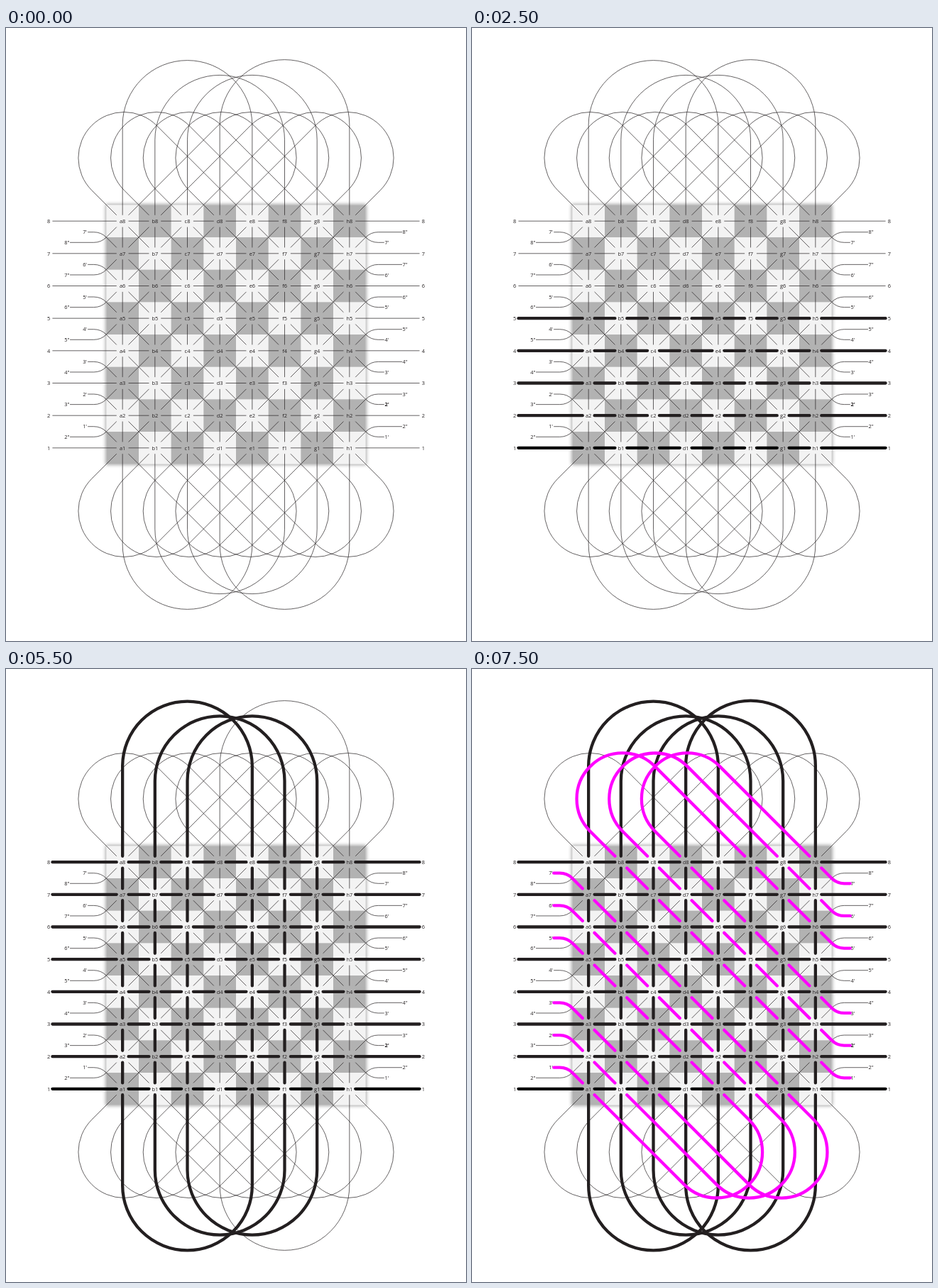
Animation, 648 px wide and 864 px high, one loop 8000 ms. Source, as an HTML page:

```html
<!DOCTYPE html>
<html lang="en">
<head>
<meta charset="utf-8">
<title>Chessboard loops</title>
<style>
  html, body { margin: 0; width: 100%; height: 100%; overflow: hidden; background: #fff; }
  svg { display: block; width: 100vw; height: 100vh; }
  path { fill: none; }
  text { font: 7.4px "Open Sans", "Noto Sans", sans-serif; fill: #231f20; }
  .thin { stroke: #231f20; stroke-width: .7; }
  .thick { stroke: #231f20; stroke-width: 4.3; stroke-linecap: round; }
</style>
</head>
<body>
<svg id="stage" viewBox="0 0 648 864">
  <defs>
    <filter id="blur" x="-10%" y="-10%" width="120%" height="120%">
      <feGaussianBlur stdDeviation="2.6"/>
    </filter>
  </defs>
  <g id="board"></g>
  <g id="thin" class="thin"></g>
  <g id="labels"></g>
  <g id="thick" class="thick"></g>
</svg>
<script>
const W = 648, H = 864, CELL = 45.67, GAP = 8.4, STEP = 500, LOOP = 8000;
const colX = c => W / 2 + (c - 3.5) * CELL;
const rowY = r => H / 2 + (3.5 - r) * CELL;
const $ = id => document.getElementById(id);
const range = n => [...Array(n).keys()];

function add(parent, tag, attrs, text) {
  const el = document.createElementNS("http://www.w3.org/2000/svg", tag);
  for (const name in attrs) el.setAttribute(name, attrs[name]);
  if (text) el.textContent = text;
  parent.append(el);
  return el;
}

// Formats a point, optionally turned half a circle about the stage centre.
const point = turned => (x, y) =>
  (turned ? [W - x, H - y] : [x, y]).map(v => v.toFixed(2)).join(" ");

function rowPath(r) {
  const y = rowY(r);
  const starts = [65.4, ...range(8).map(c => colX(c) + GAP)];
  const ends = [...range(8).map(c => colX(c) - GAP), W - 65.4];
  return starts.map((x, i) => `M${x} ${y}H${ends[i]}`).join("");
}

function columnArch(j, turned) {
  const p = point(turned), y = j % 3 ? 157.8 : 136, r = 2 * CELL;
  const left = colX(j), right = colX(j + 4), foot = rowY(7) - GAP;
  return `M${p(left, foot)}L${p(left, y)}A${r} ${r} 0 0 1 ${p(right, y)}L${p(right, foot)}`;
}

function columnPath(j) {
  let d = columnArch(j, false) + columnArch(3 - j, true);
  for (const c of [j, j + 4])
    for (const r of range(7)) d += `M${colX(c)} ${rowY(r) - GAP}V${rowY(r + 1) + GAP}`;
  return d;
}

function diagonalLoop(j, turned) {
  const p = point(turned), r = CELL * Math.SQRT2;
  const cx = colX(j) + 2.3, cy = 183.06, foot = rowY(7) - GAP;
  return `M${p(colX(j) - GAP, foot)}L${p(cx - CELL, cy + CELL)}` +
    `A${r} ${r} 0 0 1 ${p(cx + CELL, cy - CELL)}L${p(colX(j + 4) - GAP, foot)}`;
}

function lead(r, endX, turned) {
  const p = point(turned), edge = colX(-.5), y = rowY(r + .5);
  return `M${p(endX, y - 7.3)}L${p(edge - 17.6, y - 7.3)}` +
    `A24.9 24.9 0 0 1 ${p(edge, y)}L${p(colX(0) - GAP, rowY(r) - GAP)}`;
}

// Falling diagonals whose column + row is k-1, k+3, k+7 or k+11, joined by loops.
function diagonalPath(k, endX) {
  let d = diagonalLoop(k % 4, false) + diagonalLoop(4 - k, true);
  for (let sum = k - 1; sum < 15; sum += 4) {
    if (sum < 7) d += lead(sum, endX, false);
    if (sum > 7) d += lead(14 - sum, endX, true);
    for (let c = Math.max(0, sum - 7); c < Math.min(7, sum); c++) {
      const r = sum - c;
      d += `M${colX(c) + GAP} ${rowY(r) + GAP}L${colX(c + 1) - GAP} ${rowY(r - 1) - GAP}`;
    }
  }
  return d;
}

function drawBoard() {
  const board = $("board"), x = colX(-.5), y = rowY(7.5), size = 8 * CELL;
  add(board, "rect", { x: x - 1, y: y - 1, width: size + 2, height: size + 2,
    fill: "#000", opacity: .36, filter: "url(#blur)" });
  add(board, "rect", { x, y, width: size, height: size, fill: "#f3f3f3" });
  for (const c of range(8))
    for (const r of range(8))
      if ((c + r) % 2 === 0)
        add(board, "rect", { x: colX(c - .5), y: rowY(r + .5), width: CELL, height: CELL, fill: "#b2b2b2" });
}

function drawLabels() {
  const label = (text, x, y, anchor = "middle", weight = 400) =>
    add($("labels"), "text", { x, y: y + 2.7, "text-anchor": anchor, "font-weight": weight,
      style: `font-weight:${weight}` }, text);
  for (const r of range(8)) {
    const rank = r + 1, y = rowY(r);
    for (const c of range(8)) label("abcdefgh"[c] + rank, colX(c), y);
    label(rank, 60.2, y);
    label(rank, W - 60.2, y);
    if (r === 7) continue;
    const edge = rowY(r + .5), above = edge - 7.3, below = edge + 7.3;
    label(rank + "′", 114, above, "end");
    label(rank + 1 + "″", 89.5, below, "end");
    label(rank + 1 + "″", W - 89.5, above, "start");
    label(rank + "′", W - 114.4, below, "start", rank === 2 ? 700 : 400);
  }
}

drawBoard();
drawLabels();

const rows = range(8).map(rowPath);
const columns = range(4).map(columnPath);
const thin = $("thin");
const mirrored = add(thin, "g", { transform: `translate(${W}) scale(-1 1)` });
for (const d of [...rows, ...columns]) add(thin, "path", { d });
for (const k of [1, 2, 3, 4]) {
  add(thin, "path", { d: diagonalPath(k, 115.2) });
  add(mirrored, "path", { d: diagonalPath(k, 90) });
}

const strokes = [
  ...rows.map((d, r) => ({ d, stroke: r ? "#231f20" : "#000" })),
  ...columns.map(d => ({ d, stroke: "#231f20" })),
  ...[1, 2, 3].map(k => ({ d: diagonalPath(k, 115.2), stroke: "#f0f" }))
].map(attrs => add($("thick"), "path", attrs));

function render(time) {
  const shown = Math.floor((time % LOOP) / STEP);
  strokes.forEach((el, i) => el.setAttribute("visibility", i < shown ? "visible" : "hidden"));
}

const began = performance.now();
function tick() {
  render(performance.now() - began);
  requestAnimationFrame(tick);
}
tick();
</script>
</body>
</html>
```
